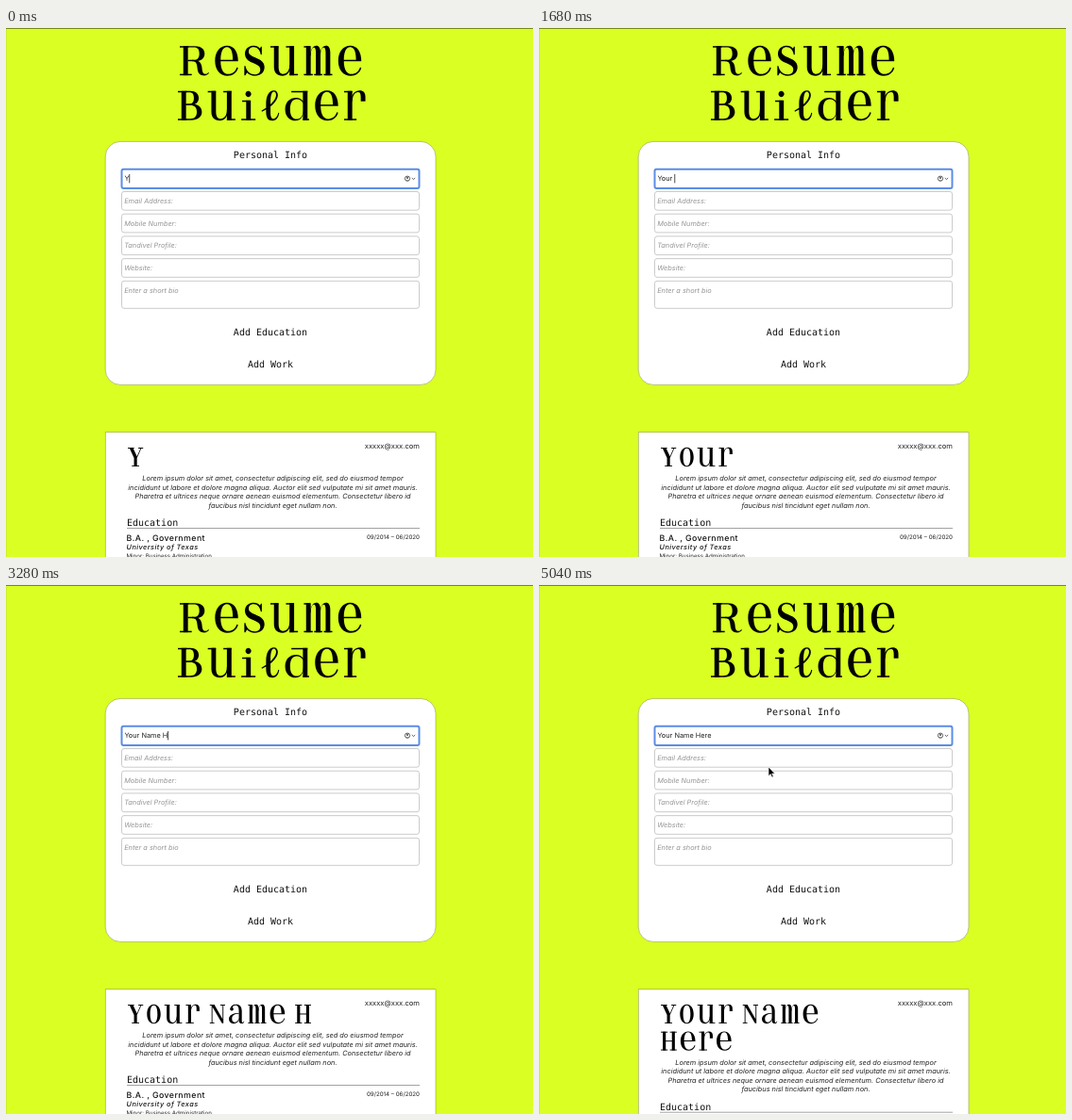
An HTML page that plays this animation: 558 by 561 pixels, repeating every 5.12 s.

```html
<!DOCTYPE html>
<html lang="en">
<head>
<meta charset="utf-8">
<title>Resume Builder</title>
<style>
  html, body { margin: 0; width: 100%; height: 100%; overflow: hidden; background: #daff22; }
  svg { display: block; }
  text { font: 7.35px Inter, sans-serif; fill: #222; white-space: pre; text-rendering: geometricPrecision; }
  .mono { font: 10px "DejaVu Sans Mono", monospace; fill: #111; }
  .mid { text-anchor: middle; }
  .end { text-anchor: end; }
  .hint { font-style: italic; fill: #949494; }
  .bio { font-style: italic; }
  .email { font-size: 7.6px; }
  .degree { font-size: 8.8px; font-weight: 500; letter-spacing: .42px; fill: #111; }
  .school { font-style: italic; font-weight: 500; letter-spacing: .45px; fill: #111; }
  .small { font-size: 6.2px; }
  .panel { fill: #fff; stroke: #7c8a3a; stroke-width: .5; }
  .field { fill: #fff; stroke: #cbcbcb; }
  .icon { fill: none; stroke: #333; stroke-width: .8; }
</style>
</head>
<body>
<svg width="558" height="561" viewBox="0 0 558 561">
  <rect width="558" height="561" fill="#daff22"/>
  <path d="M0 .5H558" stroke="#76861c"/>
  <path d="M.25 1V561" stroke="#b5d02c" stroke-width=".5"/>
  <g id="title" role="img" aria-label="Resume Builder"></g>

  <rect class="panel" x="105.2" y="120.4" width="349.8" height="258" rx="16"/>
  <text class="mono mid" x="280" y="138">Personal Info</text>
  <g id="form"></g>
  <rect x="122.5" y="149.7" width="315" height="20.2" rx="2" fill="#fff" stroke="#5b8de6" stroke-width="2"/>
  <text id="typed" x="125.4" y="162.4" xml:space="preserve"></text>
  <rect id="caret" y="155" width=".8" height="9.4" fill="#222"/>
  <g class="icon">
    <circle cx="425" cy="159.7" r="2.6"/>
    <path d="M429.8 159l1.7 1.6 1.7-1.6"/>
    <path d="M423.6 161.6q1.4-1.4 2.8 0z" fill="#333" stroke="none"/>
    <circle cx="425" cy="159" r=".9" fill="#333" stroke="none"/>
  </g>
  <text class="mono mid" x="280" y="325.7">Add Education</text>
  <text class="mono mid" x="280" y="359.7">Add Work</text>

  <rect class="panel" x="105.2" y="428.8" width="349.8" height="150"/>
  <text class="email end" x="438" y="446.3">xxxxx@xxx.com</text>
  <g id="name" role="img"></g>
  <g id="details">
    <g id="bio"></g>
    <text class="mono" x="128" y="528">Education</text>
    <path d="M128 530.5H438" stroke="#8a8a8a" stroke-width=".8"/>
    <text class="degree" x="127.5" y="543.6">B.A. , Government</text>
    <text class="small end" x="438" y="542.2">09/2014 – 06/2020</text>
    <text class="school" x="127.5" y="553">University of Texas</text>
    <text class="small" x="127.5" y="561.8">Minor: Business Administration</text>
  </g>
  <path id="mouse" d="M0 0V9.6L2.2 7.6 3.7 11 5.2 10.3 3.7 7.1H6.7Z" fill="#000" stroke="#fff" stroke-width=".6"/>
</svg>
<script>
const $ = id => document.getElementById(id);

// Unicase display letters, 31 units tall: [width, ...shapes]
const stem = (x, y = 0) => `M${x} ${y}h5.2V31h-5.2z`;
const bar = (x, y, w) => `M${x} ${y}h${w}v1.5h${-w}z`;
const arch = x => `M${x} 9c.5-5 3-9.5 7-9.5c3 0 4.7 2.5 4.7 7.5V31h-5.2V7c0-3.5-.7-5.5-2.2-5.5c-2.3 0-3.6 3.5-3.6 9.5z`;
const glyphs = {
  " ": [4.7],
  R: [33, stem(4), bar(0, 0, 10), bar(0, 29.5, 13.5),
    "M9 0H17C24 0 28 3 28 8S24 16 17 16H9V14.6H16C20 14.6 22 12.5 22 8S20 1.4 16 1.4H9z",
    "M14 14.6C22 14.6 24.5 18 25 23C25.4 28 26.5 29.6 29 29.6Q31 29.6 32 28L33 28.4C32 30.3 30 31.2 27.5 31.2C22.5 31.2 20.3 28.5 19.8 23.5C19.4 18.5 18.5 16 14 16z"],
  B: [27, stem(4), bar(0, 0, 10), bar(0, 29.5, 10),
    "M9 0H14C20 0 23.5 3 23.5 7.5S20 15 14 15H9V13.6H13C16.5 13.6 18 11.5 18 7.5S16.5 1.5 13 1.5H9z",
    "M9 13.6H15C22.5 13.6 27 17 27 22.3S22.5 31 15 31H9V29.5H14C19 29.5 21.3 27 21.3 22.3S19 15.1 14 15.1H9z"],
  e: [26, "M26 16H6.3C6.5 25 9.5 29.6 15 29.6C19.5 29.6 23 27 24.6 22.5L26 23C24.3 28.5 20 31.5 14 31.5C5.5 31.5 0 25 0 15.5S5.5-.5 13.5-.5S26 6 26 16zM6.3 14.5H20C20 6 18 1 13.4 1S6.5 6 6.3 14.5z"],
  s: [23, "M20 .5V9H18.8C18 4 15 1 10.8 1C7.5 1 5.2 2.8 5.2 5.7C5.2 9 8.5 10.3 13 12.2C19 14.6 23 17 23 22.3C23 28 18.5 31.5 12 31.5C8.5 31.5 5.5 30.3 3.3 28L1.5 31H.3V21H1.6C2.6 26.5 6.5 30 11.8 30C15.8 30 18.3 28 18.3 25C18.3 21.3 15 20 10 17.9C4.5 15.5 1 13 1 8C1 3 5-.5 10.8-.5C14-.5 16.4.6 18 2.5L19 .5z"],
  u: [31, stem(21.5), bar(0, 0, 9), bar(17.5, 0, 9), bar(21.5, 29.5, 9.5),
    "M4 0h5.2V22C9.2 27 11 29.5 14.5 29.5C18.5 29.5 21.5 26 21.5 20H22.8C22.8 27 19 31.5 13.5 31.5C7.5 31.5 4 28 4 22z"],
  m: [32, stem(2.5), bar(0, 0, 7), arch(7), arch(18), bar(0, 29.5, 10), bar(11.5, 29.5, 9.2), bar(22.4, 29.5, 9.6)],
  i: [16, stem(5.5, 10), bar(1, 10, 9), bar(0, 29.5, 16), "M8 0a3.2 3.2 0 1 1-.1 0z"],
  l: [20, "M0 21C8 17 16.5 10 16.5 4.5C16.5 2 15.5.8 14 .8C11.5.8 10.2 5 10.2 13V23C10.2 27.5 11.3 29.5 13.5 29.5C16 29.5 18 27 19 23L20 23.4C19 28.5 16.5 31.5 12 31.5C7.5 31.5 5.2 28.5 5.2 22V14C5.2 5 8.5-.5 14-.5C17-.5 18.5 1.5 18.5 4.5C18.5 11 9 18.5.6 22z"],
  d: [27, stem(20), bar(7, 0, 18.2), bar(20, 29.5, 7),
    "M20.5 11C18.5 8.5 15.8 7.2 12.5 7.2C5 7.2 0 12 0 19.4S4.8 31.5 11.8 31.5C16.5 31.5 19.5 28.5 20.5 24V20.5C20.2 26.5 17.5 29.8 13 29.8C8.3 29.8 5.6 26 5.6 19.4S8.3 8.8 13 8.8C16.5 8.8 19 10.6 20.5 13.5z"],
  a: [27, "M2 7.2a3 3 0 1 1 0 .1z",
    "M2.5 7C3 2.5 6.5-.5 12.3-.5C19-.5 22.7 3.5 22.7 10.5V26C22.7 28.5 23.3 29.6 24.4 29.6Q26 29.6 26.2 27.5L27 27.8C26.6 30.2 25.2 31.4 22.7 31.4C19.5 31.4 17.5 29.5 17.5 26V10C17.5 4 15.5 1 11.8 1C8.5 1 6.3 2.8 6 6z",
    "M17.6 14C8 14 0 17 0 23.5C0 28.5 3.5 31.5 8.3 31.5C13 31.5 16.5 28.8 17.6 25V22C16.5 26.5 14 29.3 10.5 29.3C7.5 29.3 5.4 27.2 5.4 23.3C5.4 18.5 9 15.4 17.6 15.4z"],
  r: [24, stem(4), bar(0, 0, 9), bar(0, 29.5, 14),
    "M8 9C9 3 12.5-.5 17.5-.5C21.8-.5 24 2 24 6.5V11H18.8V6.5C18.8 3 18 1.2 15.8 1.2C12 1.2 9.2 5 9.2 12z"],
  o: [24, "M12-.5C19-.5 24 6 24 15.5S19 31.5 12 31.5S0 25 0 15.5S5-.5 12-.5zM12 1C8 1 5.6 6 5.6 15.5S8 30 12 30S18.4 25 18.4 15.5S16 1 12 1z"],
  Y: [27, "M2.5 0H8.8L16 14.5 22.5 1.2H23.8L16.1 17V31H10.9V17z", bar(0, 0, 11), bar(18.5, 0, 8.5), bar(7, 29.5, 13)],
  N: [27, "M1.5 0H8L22.5 24V0H24V31H21.5L4.7 4V31H3.2V2z", bar(0, 0, 8), bar(18.5, 0, 8.5), bar(0, 29.5, 8)],
  H: [28, stem(3.5), stem(19.5), bar(0, 0, 12), bar(16, 0, 12), bar(0, 29.5, 12), bar(16, 29.5, 12), bar(8, 14.8, 12)],
};
const GAP = 6.3, NARROW = .94;

const advance = c => glyphs[c][0] * NARROW + GAP;
const lineWidth = s => [...s].reduce((w, c) => w + advance(c), -GAP);

function lettering(s, x, top, scale) {
  let pen = 0;
  const parts = [...s].map(c => {
    const shapes = glyphs[c].slice(1).map(d => `<path d="${d}"/>`).join("");
    const g = `<g transform="translate(${pen}) scale(${NARROW} 1)">${shapes}</g>`;
    pen += advance(c);
    return g;
  });
  return `<g transform="translate(${x} ${top}) scale(${scale})">${parts.join("")}</g>`;
}

$("title").innerHTML = lettering("Resume", 184, 19.2, 1) + lettering("Builder", 182, 66.8, 1);

$("form").innerHTML = ["Email Address:", "Mobile Number:", "Tandivel Profile:", "Website:", "Enter a short bio"]
  .map((label, i) => {
    const y = 173.5 + 23.7 * i;
    return `<rect class="field" x="122.5" y="${y}" width="315" height="${i < 4 ? 19.7 : 29}" rx="2.5"/>
      <text class="hint" x="125.2" y="${y + 12.4}">${label}</text>`;
  }).join("");

$("bio").innerHTML = [
  "Lorem ipsum dolor sit amet, consectetur adipiscing elit, sed do eiusmod tempor",
  "incididunt ut labore et dolore magna aliqua. Auctor elit sed vulputate mi sit amet mauris.",
  "Pharetra et ultrices neque ornare aenean euismod elementum. Consectetur libero id",
  "faucibus nisl tincidunt eget nullam non.",
].map((s, i) => `<text class="bio mid" x="282.5" y="${480 + 9.5 * i}">${s}</text>`).join("");

const LOOP = 5120, STEP = 80;
const message = "Your Name Here";
const keyTimes = [0, 80, 160, 320, 1600, 1920, 2160, 2320, 2480, 2800, 3120, 3360, 3440, 3520];
const nameScale = .64, nameRoom = 205, nameLeading = 28.7;
let shown = "";

function showName(s) {
  if (s === shown) return;
  shown = s;
  $("typed").textContent = s;
  $("name").setAttribute("aria-label", s);
  const wraps = lineWidth(s) * nameScale > nameRoom;
  const cut = s.lastIndexOf(" ");
  const lines = wraps ? [s.slice(0, cut), s.slice(cut + 1)] : [s];
  $("name").innerHTML = lines
    .map((line, i) => lettering(line, 129, 445 + nameLeading * i, nameScale)).join("");
  $("details").setAttribute("transform", `translate(0 ${wraps ? nameLeading : 0})`);
}

function moveMouse(t) {
  const start = 4400, end = 5040;
  $("mouse").style.display = t < start ? "none" : "";
  const p = Math.max(0, Math.min(1, (t - start) / (end - start)));
  const k = .25 * p + .75 * p * p * (3 - 2 * p);
  $("mouse").setAttribute("transform", `translate(${553 - 310 * k} ${546 - 353 * k})`);
}

function draw(now) {
  const t = Math.floor(now % LOOP / STEP) * STEP;
  const count = keyTimes.filter(k => k <= t).length;
  showName(message.slice(0, count));
  const caretOn = (t - keyTimes[count - 1]) % 1000 < 500;
  $("caret").style.display = caretOn ? "" : "none";
  $("caret").setAttribute("x", 125.4 + $("typed").getComputedTextLength());
  moveMouse(t);
}

let origin;
function tick(now) {
  origin ??= now;
  draw(now - origin);
  requestAnimationFrame(tick);
}
draw(0);
requestAnimationFrame(tick);
</script>
</body>
</html>
```
